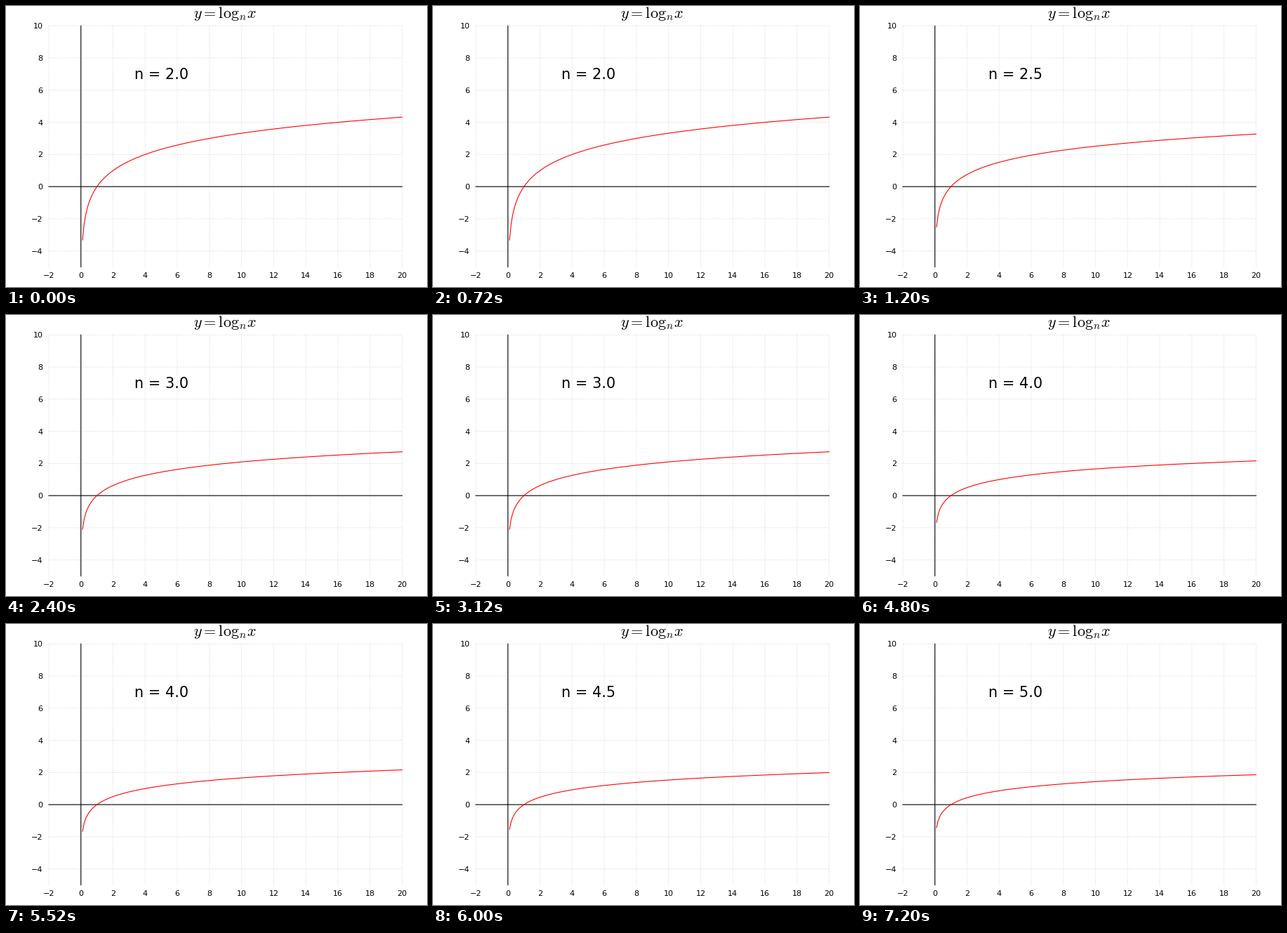
These frames come from a looping animation (600 by 400 pixels, 8000 ms). A matplotlib script:

```python
import numpy as np
import matplotlib.pyplot as plt
from matplotlib.animation import FuncAnimation

plt.rcParams["font.family"] = "DejaVu Sans"
plt.rcParams["mathtext.fontset"] = "cm"

DPI = 100
WIDTH, HEIGHT = 600, 400
LEFT, RIGHT, TOP, BOTTOM = 61, 564.5, 28.3, 371.5
PT = 72 / DPI  # points per pixel


def px(x):
    return LEFT + (x + 2) * (RIGHT - LEFT) / 22


def py(y):
    return BOTTOM - (y + 5) * (BOTTOM - TOP) / 15


fig = plt.figure(figsize=(WIDTH / DPI, HEIGHT / DPI), dpi=DPI, facecolor="white")
ax = fig.add_axes([0, 0, 1, 1])
ax.set_xlim(0, WIDTH)
ax.set_ylim(HEIGHT, 0)
ax.axis("off")


def rule(xs, ys, width, **style):
    ax.plot(xs, ys, lw=width * PT, snap=False, **style)


def label(x, y, text, size, ha="center"):
    return ax.text(x, y, text, fontsize=size, ha=ha, va="baseline", color="black")


def tick(value):
    return str(value).replace("-", "\u2212")


grid = dict(color="black", alpha=0.12, ls=(0, (1.5, 1.5)), dash_capstyle="butt", zorder=1)
for x in range(-2, 21, 2):
    rule([px(x)] * 2, [BOTTOM, TOP], 1, **grid)
    label(px(x), 387, tick(x), 8)
for y in range(-4, 11, 2):
    rule([LEFT, RIGHT], [py(y)] * 2, 1, **grid)
    label(52.5, py(y) + 4, tick(y), 8, ha="right")

rule([LEFT, RIGHT], [py(0)] * 2, 1.1, color="black", zorder=2)
rule([px(0)] * 2, [BOTTOM, TOP], 1.1, color="black", zorder=2)

label(312, 17, r"$y = \mathrm{log}_n x$", 16)
base_label = label(px(5), 104.4, "", 15)

xs = np.linspace(0.1, 20, 200)
curve, = ax.plot([], [], color="red", lw=1.1 * PT, zorder=3)


def draw(i):
    n = 2 + 0.5 * (i // 3)
    curve.set_data(px(xs), py(np.log(xs) / np.log(n)))
    base_label.set_text(f"n = {n:.1f}")
    return curve, base_label


anim = FuncAnimation(fig, draw, frames=20, interval=400, repeat=True, repeat_delay=0)
plt.show()
```
